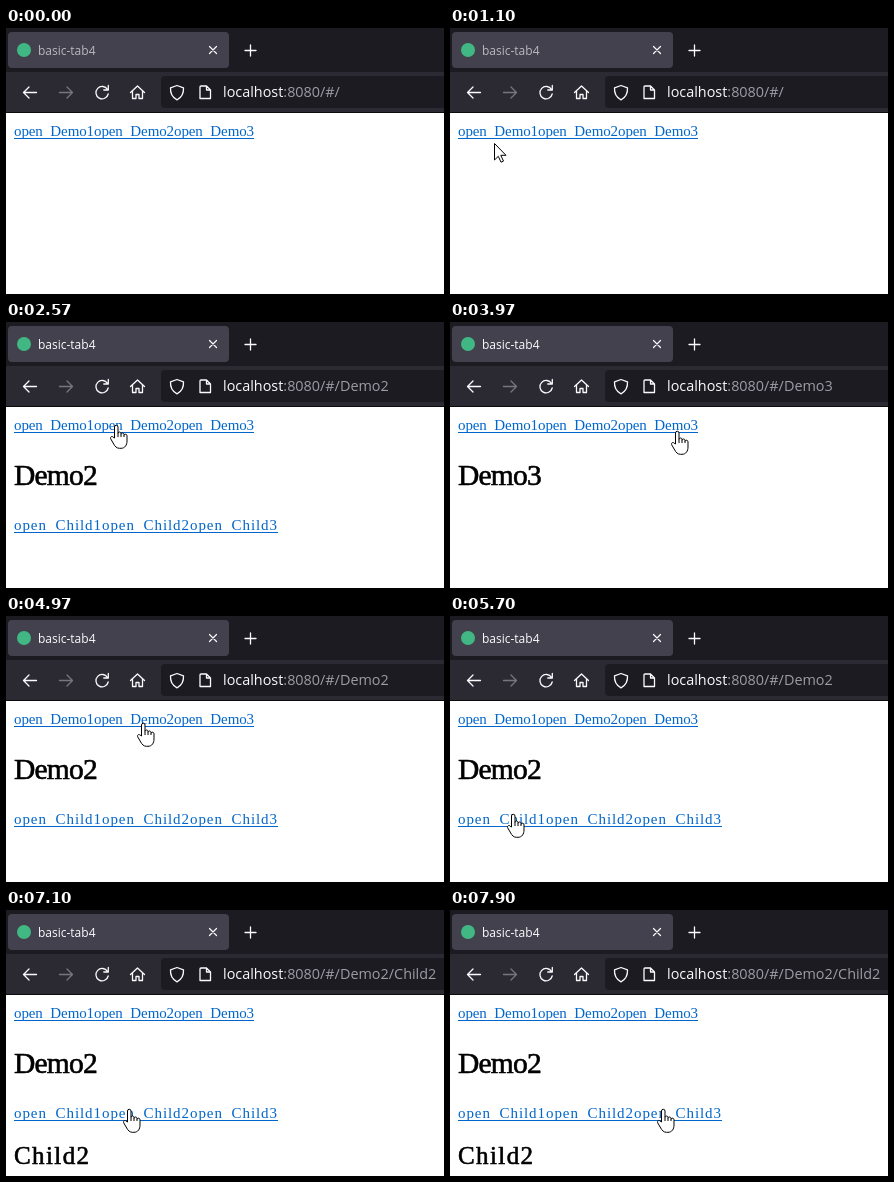
These frames come from a looping animation (438x266 px, 8000 ms). An HTML page:

```html
<!DOCTYPE html>
<html lang="en">
<head>
<meta charset="utf-8">
<title>Nested routes</title>
<style>
  html, body { margin: 0; width: 100%; height: 100%; overflow: hidden; background: #fff; }
  svg { display: block; width: 438px; height: 266px; }
  .ui { font-family: "Open Sans", "Noto Sans", sans-serif; }
  .icon { fill: none; stroke: #fbfbfe; stroke-width: 1.3; stroke-linecap: round; stroke-linejoin: round; }
  .page { font-family: "Liberation Serif", "Noto Serif", serif; }
  .link { font-size: 15px; word-spacing: 4px; }
  .links { fill: #0066cc; }
  .demo { letter-spacing: -.11px; }
  .child { letter-spacing: .93px; }
  .heading { stroke: #000; stroke-width: .6; }
  .h1 { font-size: 29.5px; letter-spacing: -.8px; }
  .h2 { font-size: 25px; letter-spacing: 1.4px; }
  .pointer { fill: #fff; stroke: #000; stroke-linejoin: round; }
</style>
</head>
<body>
<svg viewBox="0 0 438 266">
  <rect width="438" height="266" fill="#fff"/>

  <g class="ui">
    <rect width="438" height="44" fill="#1c1b22"/>
    <rect x="2" y="4" width="221" height="36" rx="4" fill="#42414d"/>
    <circle cx="18" cy="22" r="7" fill="#41b883"/>
    <text id="tab" x="32" y="27" font-size="12">basic-tab4</text>
    <rect y="44" width="438" height="40" fill="#2b2a33"/>
    <rect y="84" width="438" height="1" fill="#0c0c0d"/>
    <rect x="155" y="48" width="300" height="32" rx="4" fill="#1c1b22"/>
    <g class="icon">
      <path stroke-width="1.2" d="M203.5 18.5l7 7m0-7l-7 7"/>
      <path d="M239 22.5h11m-5.5-5.5v11"/>
      <path d="M30.5 64.5h-13m5.5-5.500l-5.500 5.500 5.500 5.500"/>
      <path stroke="#77767e" d="M53.500 64.500h13m-5.500-5.500l5.500 5.500-5.500 5.500"/>
      <path d="M101.500 61.500a6.200 6.200 0 1 0 .7 4.500M102.300 57.500v4.500h-4.500"/>
      <path d="M124.500 64.500l7-6.500 7 6.500M126.500 63v7.500h3.500v-4h3v4h3.500v-7.500"/>
      <path d="M171 57.500l6.500 2.300c.3 5.200-1.500 9.500-6.500 12-5-2.500-6.800-6.800-6.500-12z"/>
      <path d="M195 58h5.500l4 4v8.500h-10.500v-11.500q0-1 1-1zM200.500 58v4h4"/>
    </g>
    <text x="217" y="69" font-size="14.4" fill="#fbfbfe">localhost<tspan id="url" fill="#9d9ca5"></tspan></text>
  </g>

  <g class="page">
    <g id="demoLinks" class="links"></g>
    <text id="demoTitle" class="heading h1" x="8" y="163"></text>
    <g id="childLinks" class="links"></g>
    <text id="childTitle" class="heading h2" x="8" y="254"></text>
  </g>

  <g id="mouse">
    <path id="arrow" class="pointer" d="M.5.5v16.500l3.800-3.700 2.700 5.900 2.500-1.100-2.700-5.800h5.200z"/>
    <g id="hand" class="pointer">
      <path d="M-1.500 13V2a1.750 1.750 0 0 1 3.500 0V8.500c0-2 3-2 3 0v1c0-2 3-2 3 0v1c0-1.800 3-1.800 3 .3V16c0 4-2 7.300-6 7.300h-1.500c-3 0-4.500-2-5.800-4.300l-2.900-5c-1-2 1-3.300 2.300-1.900z"/>
      <path fill="none" d="M2 8.500v3.500m3-2.500v2.500m3-1.500v1.500"/>
    </g>
  </g>
</svg>

<script>
const LOOP = 8000;
const $ = id => document.getElementById(id);

// [time, path]
const routes = [
  [0, ""], [1500, "Demo1"], [2570, "Demo2"], [3500, "Demo3"],
  [4570, "Demo2"], [5830, "Demo2/Child1"], [6970, "Demo2/Child2"]
];

// [first step, last step, steps, x, y]
const start = [325, 262];
const moves = [
  [500, 1100, 10, 44, 115], [1170, 1230, 2, 44, 108],
  [1970, 2170, 4, 156, 97], [2240, 2430, 3, 110, 103],
  [2830, 3030, 4, 229, 109], [3970, 3970, 1, 227, 109],
  [4030, 4230, 4, 138, 105], [4970, 5700, 12, 63, 198],
  [6370, 6700, 6, 123, 199], [7430, 7900, 8, 213, 199]
];

function linkRow(id, name, step, baseline) {
  let out = "";
  for (let i = 0; i < 3; i++)
    out += `<text class="link ${name.toLowerCase()}" x="${8 + i * step}" y="${baseline}">open ${name}${i + 1}</text>`;
  $(id).innerHTML = out + `<rect x="8" y="${baseline + 2}" width="${step * 3}" height="1"/>`;
}

function mouseAt(t) {
  let [x, y] = start;
  for (const [from, to, steps, tx, ty] of moves) {
    if (t < from) break;
    const done = t >= to ? steps : 1 + Math.floor((t - from) / (to - from) * (steps - 1));
    const p = done / steps;
    const eased = p * p * (3 - 2 * p);
    x += (tx - x) * eased;
    y += (ty - y) * eased;
  }
  return [Math.round(x), Math.round(y)];
}

const show = (id, on) => $(id).setAttribute("visibility", on ? "visible" : "hidden");

function render(t) {
  const path = routes.filter(r => r[0] <= t).pop()[1];
  const [demo, child = ""] = path.split("/");
  const nested = demo === "Demo2";
  $("url").textContent = ":8080/#/" + path;
  $("demoTitle").textContent = demo;
  $("childTitle").textContent = child;
  $("tab").setAttribute("fill", t < 1430 ? "#b9b8c0" : "#fbfbfe");
  show("childLinks", nested);

  const [x, y] = mouseAt(t);
  const inside = t >= moves[0][0];
  const onLink = x >= 8 && (y >= 95 && y < 111 && x < 248 || nested && y >= 195 && y < 211 && x < 272);
  $("mouse").setAttribute("transform", `translate(${x} ${y})`);
  show("arrow", inside && !onLink);
  show("hand", inside && onLink);
}

linkRow("demoLinks", "Demo", 80, 108);
linkRow("childLinks", "Child", 88, 208);

function tick() {
  render(performance.now() % LOOP);
  requestAnimationFrame(tick);
}
tick();
</script>
</body>
</html>
```
